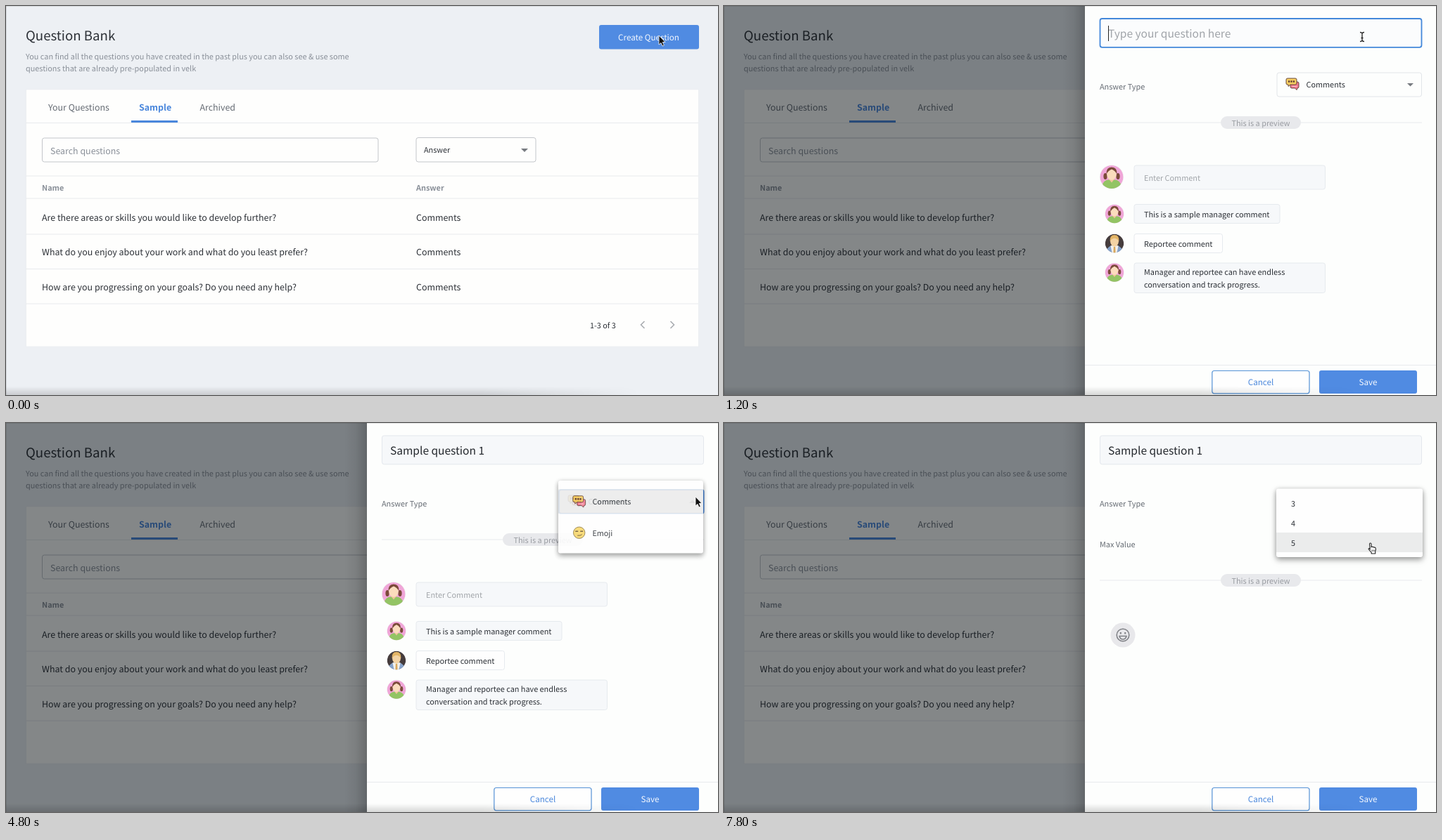
These frames come from a looping animation (1012 px wide and 554 px high, 8000 ms). An HTML page:

```html
<!DOCTYPE html>
<html lang="en">
<head>
<meta charset="utf-8">
<title>Question Bank</title>
<style>
html, body { margin: 0; width: 100%; height: 100%; overflow: hidden; background: #edf0f4; }
svg { display: block; width: 100%; height: 100%; }
text { font: 10.87px "Noto Sans CJK JP", "Noto Sans CJK SC", "Noto Sans CJK", "Noto Sans", sans-serif; fill: #2d3137; white-space: pre; text-rendering: geometricPrecision; }
.h1 { font-size: 18.65px; }
.row { font-size: 12.43px; }
.big { font-size: 15.52px; }
.btn { font-size: 11.65px; }
.grey { fill: #8a9099; }
.mid { fill: #656b73; }
.hint { fill: #a2a6aa; }
.bold { font-weight: 700; }
.white { fill: #f4f8fe; }
.blue { fill: #4a87dc; }
.rule { stroke: #e8eaed; fill: none; }
.field { fill: #fefefd; stroke: #c3c6ca; }
.soft { fill: #f6f8fa; stroke: #e6eaee; }
.c { text-anchor: middle; }
.arrow { fill: #777b80; }
.menu { transform-origin: 785px 82px; filter: drop-shadow(0 4px 4px rgba(0,0,0,.25)) drop-shadow(0 1px 3px rgba(0,0,0,.25)); }
</style>
</head>
<body>
<svg viewBox="0 0 1012 554" preserveAspectRatio="none">
  <defs>
    <linearGradient id="edge"><stop stop-color="#000" stop-opacity="0"/><stop offset=".5" stop-color="#000" stop-opacity=".06"/><stop offset="1" stop-color="#000" stop-opacity=".2"/></linearGradient>
    <linearGradient id="foot" x2="0" y2="1"><stop stop-color="#000" stop-opacity="0"/><stop offset="1" stop-color="#000" stop-opacity=".15"/></linearGradient>
    <linearGradient id="fadeOut"><stop offset=".75" stop-color="#fff"/><stop offset="1" stop-color="#000"/></linearGradient>
    <mask id="footMask"><rect y="540" width="900" height="14" fill="url(#fadeOut)"/></mask>
    <clipPath id="round"><circle r="16.5"/></clipPath>

    <g id="woman">
      <circle r="17" fill="#eeeaec"/>
      <g clip-path="url(#round)">
        <circle r="16.5" fill="#f0a6d8"/>
        <ellipse cx="-9" cy="-1" rx="2.600" ry="4.500" fill="#7b4a3a"/><ellipse cx="9" cy="-1" rx="2.600" ry="4.500" fill="#7b4a3a"/>
        <path d="M-14 18Q-14 5-5 4H5Q14 5 14 18Z" fill="#93c464"/>
        <path d="M-4 3H4L0 8Z" fill="#f0c49a"/>
        <ellipse cy="-4" rx="6.800" ry="8.500" fill="#fbdcbd"/>
        <path d="M-7.500-4Q-8-14 0-14Q8-14 7.500-4Q5-9 0-11Q-5-9-7.500-4Z" fill="#7b4a3a"/>
      </g>
    </g>
    <g id="man">
      <circle r="17" fill="#eceef0"/>
      <g clip-path="url(#round)">
        <circle r="16.5" fill="#453c3c"/>
        <path d="M-15 18Q-14 6-5 4H5Q14 6 15 18Z" fill="#86a3cb"/>
        <path d="M-7 4H7L4 18H-4Z" fill="#f3f1ec"/>
        <path d="M-1.500 6H1.500L2 18H-2Z" fill="#d9a85c"/>
        <ellipse cy="-4" rx="7.500" ry="9.500" fill="#f3d3a4"/>
        <path d="M-8-3Q-9-15 0-15Q9-15 8-3Q6-8 0-9Q-6-8-8-3Z" fill="#e3b566"/>
      </g>
    </g>
    <g id="chat" stroke="#5a3a35" stroke-width=".9">
      <path d="M-2-3H7Q9-3 9-1V4Q9 6 7 6L6 8.500L3.500 6H-1Q-3 6-3 4V-2Z" fill="#f0788e"/>
      <path d="M-7-8H4Q6-8 6-6V-1Q6 1 4 1H-3L-6 3.500V1H-7Q-9 1-9-1V-6Q-9-8-7-8Z" fill="#f6cd62"/>
      <path d="M-6-3.500H3.500" stroke-width="2.400" stroke-dasharray="2.200 1.200"/>
      <path d="M-.5 3.500H6.500" stroke="#fbd3dc"/>
    </g>
    <g id="face" stroke="#6d5733" fill="none">
      <circle r="8.300" fill="#f8d86e" stroke="#94804a"/>
      <path d="M-5.500-2H-1.500M1.500-2H5.500" stroke-width="1.700"/>
      <path d="M-2.500 4Q2 4.500 4 2.500"/>
    </g>
    <g id="pill">
      <path class="rule" d="M534 166H992"/>
      <rect x="706" y="157" width="114" height="18" rx="9" fill="#e8e9ec"/>
      <text class="c" x="763" y="170.500" style="fill:#999ca2">This is a preview</text>
    </g>
  </defs>

  <rect width="1012" height="554" fill="#edf0f4"/>
  <text class="h1" x="28" y="49">Question Bank</text>
  <text class="grey" x="28" y="76">You can find all the questions you have created in the past plus you can also see &amp; use some</text>
  <text class="grey" x="28" y="93">questions that are already pre-populated in velk</text>
  <rect x="843" y="27" width="142" height="34.500" rx="3" fill="#508be2"/>
  <text class="btn white c" x="913.500" y="49">Create Question</text>

  <rect x="28.500" y="119" width="956" height="366" fill="#fefefd" stroke="#e6e9ed" stroke-width=".6"/>
  <text class="row mid" x="60" y="148.700">Your Questions</text>
  <text class="row blue bold" x="189" y="148.700">Sample</text>
  <text class="row mid" x="275.500" y="148.700">Archived</text>
  <path class="rule" d="M28 166.500H984M28 242H984M28 274H984M28 325H984M28 374.500H984M28 424H984"/>
  <rect x="178" y="163" width="66" height="3" class="blue"/>
  <rect class="field" x="51.500" y="188" width="477.500" height="34" rx="3"/>
  <text class="row grey" x="63" y="210.500">Search questions</text>
  <rect class="field" x="583" y="187.500" width="170" height="34.500" rx="3"/>
  <text x="594" y="208.500">Answer</text>
  <path class="arrow" d="M732 203H742L737 208Z"/>
  <text class="grey bold" x="51" y="262.500">Name</text>
  <text class="grey bold" x="583" y="262.500">Answer</text>
  <text class="row" x="51" y="305.700">Are there areas or skills you would like to develop further?</text>
  <text class="row" x="51" y="355.200">What do you enjoy about your work and what do you least prefer?</text>
  <text class="row" x="51" y="404.700">How are you progressing on your goals? Do you need any help?</text>
  <text class="row" x="583" y="305.700">Comments</text>
  <text class="row" x="583" y="355.200">Comments</text>
  <text class="row" x="583" y="404.700">Comments</text>
  <text x="830" y="458.500">1-3 of 3</text>
  <path d="M907.500 449L902.500 454L907.500 459M944.500 449L949.500 454L944.500 459" fill="none" stroke="#a9acb0" stroke-width="1.600"/>
  <rect id="dim" width="1012" height="554" fill="#060c10"/>

  <g id="panel">
    <rect x="481" width="32" height="554" fill="url(#edge)"/>
    <rect x="513" width="499" height="554" fill="#fdfefd"/>
    <rect id="input" x="534.500" y="18" width="457" height="40.800" rx="3"/>
    <text id="typed" class="big" x="546" y="45.300"></text>
    <path id="caret" d="M546.500 28V50" stroke="#222"/>
    <text class="mid" x="534" y="118.500">Answer Type</text>
    <rect id="typeBox" x="786" y="95" width="205.500" height="34" rx="3" fill="#fdfefd"/>
    <path id="typeArrow" class="arrow"/>
    <g id="asComments">
      <use href="#chat" x="808" y="111"/>
      <text x="827.500" y="115.700">Comments</text>
      <use href="#pill"/>
      <rect class="soft" x="583" y="227" width="271.500" height="34" rx="3"/>
      <text class="hint" x="597" y="248.500">Enter Comment</text>
      <rect class="soft" x="583" y="282.500" width="207" height="27" rx="3"/>
      <text x="597" y="300.500">This is a sample manager comment</text>
      <rect class="soft" style="fill:#fefefe" x="583" y="324.500" width="125.500" height="27" rx="3"/>
      <text x="597" y="342.500">Reportee comment</text>
      <rect class="soft" x="583" y="366" width="271.500" height="42.500" rx="3"/>
      <text x="597" y="383">Manager and reportee can have endless</text>
      <text x="597" y="400.500">conversation and track progress.</text>
      <use href="#woman" transform="translate(551 243.500)"/>
      <use href="#woman" transform="translate(555 296) scale(.8)"/>
      <use href="#man" transform="translate(555 338) scale(.8)"/>
      <use href="#woman" transform="translate(555 379.500) scale(.8)"/>
    </g>
    <g id="asEmoji">
      <use href="#face" x="808" y="111"/>
      <text x="827.500" y="115.700">Emoji</text>
      <text class="mid" x="534" y="176.500">Max Value</text>
      <rect id="maxBox" x="786" y="155" width="205.500" height="34" rx="3" fill="#fdfefd"/>
      <path id="maxArrow" class="arrow"/>
      <text x="800" y="176">5</text>
      <use href="#pill" y="58"/>
      <g transform="translate(567 302)" fill="none" stroke="#7d7f84" stroke-width="1.500">
        <circle r="17.500" fill="#e8e8eb" stroke="none"/>
        <circle r="8.800"/>
        <path d="M-5 1.500H5Q4 6 0 6Q-4 6-5 1.500Z"/>
        <path d="M-3.200-4V-1.500M3.200-4V-1.500" stroke-width="2"/>
      </g>
    </g>
  </g>
  <path id="footRule" class="rule" d="M513 511.500H1012"/>
  <g id="footer">
    <rect x="693.800" y="519.500" width="138.200" height="32.300" rx="3" fill="#fefefe" stroke="#5592d6" stroke-width="1.200"/>
    <text class="btn blue c" x="763" y="540">Cancel</text>
    <rect x="846" y="519" width="139" height="33" rx="3" fill="#508be2"/>
    <text class="btn white c" x="915.500" y="540">Save</text>
  </g>

  <g id="typeMenu" class="menu">
    <rect x="785" y="82" width="208" height="104.500" rx="3" fill="#fefefe"/>
    <rect id="typeRow" x="785" width="208" height="35" fill="#ebecec"/>
    <use href="#chat" x="815" y="112"/><text x="834" y="116.500">Comments</text>
    <use href="#face" x="815" y="157"/><text x="834" y="161.500">Emoji</text>
  </g>
  <g id="maxMenu" class="menu">
    <rect x="785" y="93.500" width="208" height="97.500" rx="3" fill="#fefefe"/>
    <rect x="785" y="156" width="208" height="28" fill="#ebecec"/>
    <text x="806" y="119">3</text><text x="806" y="147">4</text><text x="806" y="175">5</text>
  </g>

  <rect y="542" width="900" height="12" fill="url(#foot)" mask="url(#footMask)"/>
  <path d="M.5 0V554M0 .5H1012" stroke="#000" stroke-opacity=".1"/>

  <g id="pointer">
    <path id="tip" d="M0 0V13L3 10.500L5 15L7.300 14L5.300 9.500H9Z" fill="#111" stroke="#fff" stroke-width=".8"/>
    <path id="beam" d="M-3-6.500Q0-6.500 0-4.500Q0-6.500 3-6.500M0-5V5M-3 6.500Q0 6.500 0 4.500Q0 6.500 3 6.500M-1.500 1.500H1.500" fill="none" stroke="#222" stroke-width="1.300"/>
    <path id="hand" d="M1.500 1.500Q1.500 0 2.700 0Q4 0 4 1.500V5.500Q5 4.500 6.200 5.700Q7.400 5 8.200 6.300Q9.600 5.700 10.200 7.200Q11 9 9.700 12V15H4.200V13.500L.4 9Q-.5 7.500 1.200 7.600L2.200 8.700Z" fill="#fff" stroke="#222" stroke-width="1.100"/>
    <path id="fingers" d="M5 9.500V12M7 9.500V12M9 9.500V12" stroke="#222" stroke-width=".8"/>
  </g>
</svg>
<script>
const LOOP = 8000, TICK = 200, PHRASE = "Sample question 1";
const $ = id => document.getElementById(id);
const show = (id, on) => $(id).style.opacity = +on;
const shift = (id, x, y = 0) => $(id).setAttribute("transform", `translate(${x} ${y})`);
const set = (id, attrs) => Object.entries(attrs).forEach(([k, v]) => $(id).setAttribute(k, v));

// Interpolates between [time, ...values] keys.
function track(keys, t) {
  const i = keys.findIndex(k => k[0] > t);
  if (i < 0) return keys[keys.length - 1].slice(1);
  const a = keys[Math.max(i - 1, 0)], b = keys[i];
  const p = Math.max(0, (t - a[0]) / (b[0] - a[0])), e = p * p * (3 - 2 * p);
  return a.slice(1).map((v, j) => v + (b[j + 1] - v) * e);
}

const path = [
  [0, 928, 42], [600, 925, 41], [1000, 907, 44], [2800, 907, 44], [3400, 966, 113],
  [4000, 976, 108], [4400, 980, 105], [4800, 980, 105], [5400, 896, 150], [5800, 896, 150],
  [6400, 914, 166], [6800, 916, 169], [7800, 916, 171]
];
const slide = [[800, 499, 499], [1000, 51, 198], [1200, 0, 0]];
const shade = [[800, 0], [1000, .41], [1200, .49]];
const typeFade = [[4600, 0], [4800, .9], [5000, 1], [5600, 1], [5800, .3], [6000, 0]];
const maxFade = [[6600, 0], [6800, .9], [7000, 1]];

function select(box, arrow, y, open, hover) {
  set(box, { stroke: open ? "#4383d8" : hover ? "#25282c" : "#e2e5e9", "stroke-width": open ? 2 : 1 });
  set(arrow, { d: open ? `M971 ${y + 2}H980L975.500 ${y - 2.5}Z` : `M971 ${y - 2}H980L975.500 ${y + 2.5}Z` });
}

function menu(id, alpha) {
  show(id, alpha);
  $(id).style.transform = `scale(${.9 + .1 * alpha})`;
}

function draw(t) {
  const [off, footOff] = track(slide, t);
  shift("panel", off + (off > 498 ? 60 : 0));
  shift("footer", footOff);
  shift("footRule", Math.min(499, footOff * 1.78));
  show("dim", track(shade, t)[0]);

  const focus = t < 4800, emoji = t >= 5600;
  const n = Math.round(Math.min(1, Math.max(0, (t - 1400) / 1400)) * PHRASE.length);
  set("input", {
    fill: n ? "#f6f8fa" : "#fbfcfd",
    stroke: focus ? "#4388da" : "#e4e8ed", "stroke-width": focus ? 1.8 : 1
  });
  $("typed").textContent = n ? PHRASE.slice(0, n) : "Type your question here";
  $("typed").style.fill = n ? "#24282d" : "#a0a4a9";
  const typing = t >= 1400 && t <= 2800;
  show("caret", focus && (typing || t <= 1200 || t % 1000 >= 600));
  shift("caret", n ? $("typed").getComputedTextLength() + 1 : 0);

  show("asComments", !emoji);
  show("asEmoji", emoji);
  const typeAlpha = track(typeFade, t)[0], maxAlpha = track(maxFade, t)[0];
  select("typeBox", "typeArrow", 112, typeAlpha > 0, t >= 3400 && t < 4800);
  select("maxBox", "maxArrow", 172, maxAlpha > 0, t >= 6200);
  menu("typeMenu", typeAlpha);
  menu("maxMenu", maxAlpha);
  set("typeRow", { y: t < 5200 ? 94.5 : 139.5 });

  shift("pointer", ...track(path, t));
  const beam = t >= 1000 && t < 3200;
  const tip = t < 200 || (t >= 4400 && t < 5200);
  show("pointer", !(t >= 1600 && t < 2800));
  show("beam", beam);
  show("tip", tip);
  show("hand", !beam && !tip);
  show("fingers", !beam && !tip);
}

const start = performance.now();
function frame() {
  const t = (performance.now() - start) % LOOP;
  draw(Math.floor(t / TICK) * TICK);
  requestAnimationFrame(frame);
}
frame();
</script>
</body>
</html>
```
